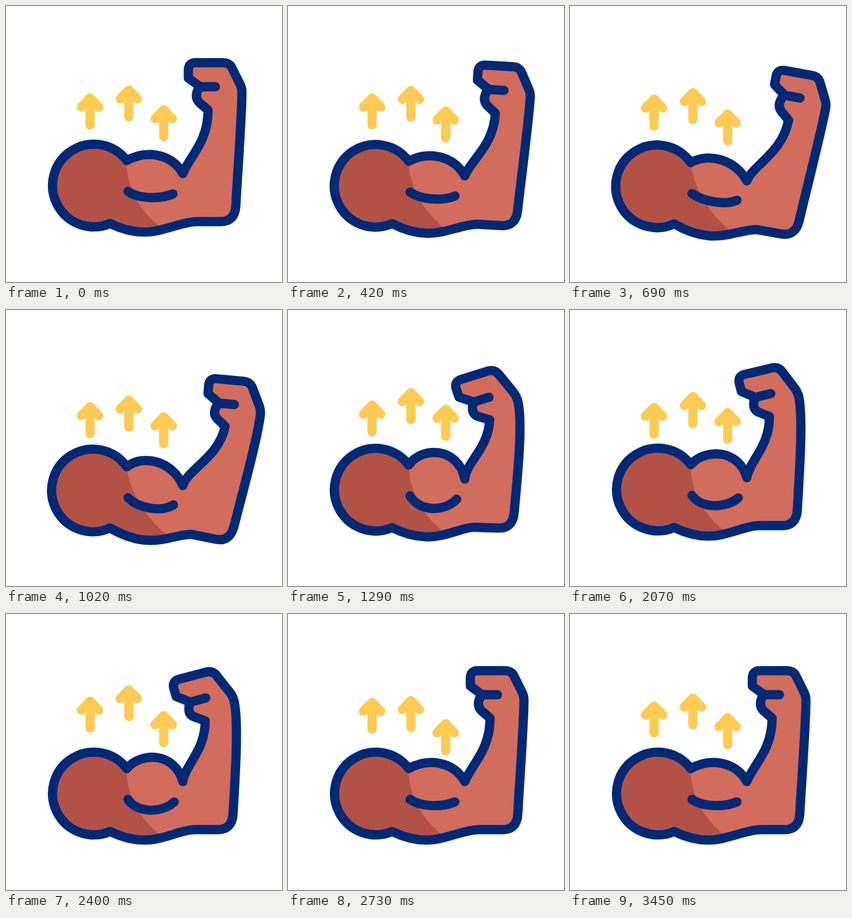
An HTML page for the animation above (3.6 s loop, 448x448 px).

```html
<!DOCTYPE html>
<html lang="en">
<head>
<meta charset="utf-8">
<title>Flexing arm</title>
<style>
  html, body { margin: 0; width: 100%; height: 100%; overflow: hidden; background: #fff; }
  svg { display: block; width: 100%; height: 100%; }
  .line, .arrow { fill: none; stroke-width: 15; stroke-linecap: round; stroke-linejoin: round; }
  .line { stroke: #002975; }
  .arrow { stroke: #fdca54; }
</style>
</head>
<body>
<svg viewBox="0 0 448 448" xmlns="http://www.w3.org/2000/svg">
  <defs>
    <clipPath id="clip"><path id="mask"/></clipPath>
    <path id="up" class="arrow" d="M-14 22L0 7.5L14 22M0 7.5V51"/>
  </defs>
  <path id="skin" fill="#d26c5d"/>
  <path id="shade" fill="#b25247" clip-path="url(#clip)"/>
  <path id="edge" class="line"/>
  <path id="crease" class="line"/>
  <path id="finger" class="line"/>
  <use href="#up"/><use href="#up"/><use href="#up"/>
</svg>
<script>
const LOOP = 3600, STEP = 30, START = 150, RISE = 750, BEAT = 450, END = RISE + 4 * BEAT;

const clamp = u => Math.min(1, Math.max(0, u));
const easeIn = u => u * u * (2 - u);
const set = (id, d) => document.getElementById(id).setAttribute('d', d);
const xy = p => p.map(n => n.toFixed(2)).join(' ');

// Moves every "x y" pair of a path through a bend.
const warp = (path, bend) => path.replace(/(\d+) (\d+)/g, (_, x, y) => xy(bend(+x, +y)));

// Two linear up-down swings after the slow first rise.
function swing(t) {
  const u = (Math.min(Math.max(t, RISE), END) - RISE) / BEAT;
  return 1 - Math.abs(u % 2 - 1);
}

function bob(t, low, high) {
  if (t < RISE) return low * easeIn(clamp(t / RISE));
  if (t > END) return low * easeIn(clamp(1 - (t - END) / BEAT));
  return low + (high - low) * swing(t);
}

function drawArm(t) {
  const reach = 1.5 * (t < RISE ? easeIn(clamp(t / RISE)) : clamp(1 - (t - RISE) / BEAT));
  const curl = 1.667 * swing(t);

  // The upper arm sinks; the forearm turns outwards, then bends at the wrist.
  const sag = (x, y) => [x, y + reach * 0.095 * (x - 162)];
  const turn = (x, y) => {
    const wrist = clamp((190 - y) / 40);
    return [
      x - reach * 0.18 * (y - 318) - curl * (4 + 0.26 * Math.max(0, 170 - y)),
      y + reach * 0.18 * (x - 237) + curl * 0.24 * wrist * Math.max(0, 360 - x)
    ];
  };
  const slant = (x, y) => sag(x + reach * 0.13 * (y - 251), y);

  const armpit = sag(196, 251), [ax, ay] = armpit;
  const crook = sag(287, 272), [bx, by] = crook;
  const outline = 'M' + xy(armpit)
    + 'C' + xy([ax + 30 - 6 * curl, ay - 17 - 10 * curl])
    + ' ' + xy([bx - 19 + 6 * curl, by - 34 - 12 * curl]) + ' ' + xy(crook)
    + 'C' + xy(sag(297 - 6 * curl, 245)) + ' '
    + warp('328 222 328 169 L314 157 Q306 149 311 137 L315 131', turn)
    + warp('L296 117 L296 104 Q296 92 308 92 L352 92 Q362 92 366 99 L380 127 Q383 133 383 140', turn)
    + warp('C383 175 376 270 373 325 C372 342 363 350 349 350 L310 350', turn)
    + warp('C285 350 255 367 225 367 C205 367 185 361 169 353', sag)
    + 'A67 67 0 1 1 ' + xy(armpit) + 'Z';
  for (const id of ['mask', 'skin', 'edge']) set(id, outline);

  const [cx, cy] = sag(198, 301), [dx, dy] = sag(271, 305);
  const dip = 9 * curl;
  set('crease', 'M' + xy([cx, cy]) + 'C' + xy([cx + 17 - 2 * curl, cy + 12 + dip])
    + ' ' + xy([dx - 21 + 2 * curl, dy + 9 + dip]) + ' ' + xy([dx + 2 * curl, dy]));
  set('finger', warp('M315 131 L340 131', turn));
  set('shade', warp('M196 251 C195 290 215 332 252 360', slant) + 'V420H40V200H' + ax + 'Z');
}

const arrows = [...document.querySelectorAll('use')].map((el, i) => ({
  el,
  x: [136.5, 199.5, 256][i],
  y: [142, 129, 161][i],
  delay: 300 - 150 * i,
  low: 10.5,
  high: -17 + 3.5 * i
}));

function draw(time) {
  const t = time - START;
  drawArm(t);
  for (const { el, x, y, delay, low, high } of arrows)
    el.setAttribute('transform', `translate(${x} ${(y + bob(t - delay, low, high)).toFixed(2)})`);
}

const start = performance.now();
function tick() {
  const t = Math.max(0, performance.now() - start) % LOOP;
  draw(Math.floor(t / STEP) * STEP);
  requestAnimationFrame(tick);
}
draw(0);
requestAnimationFrame(tick);
</script>
</body>
</html>
```
